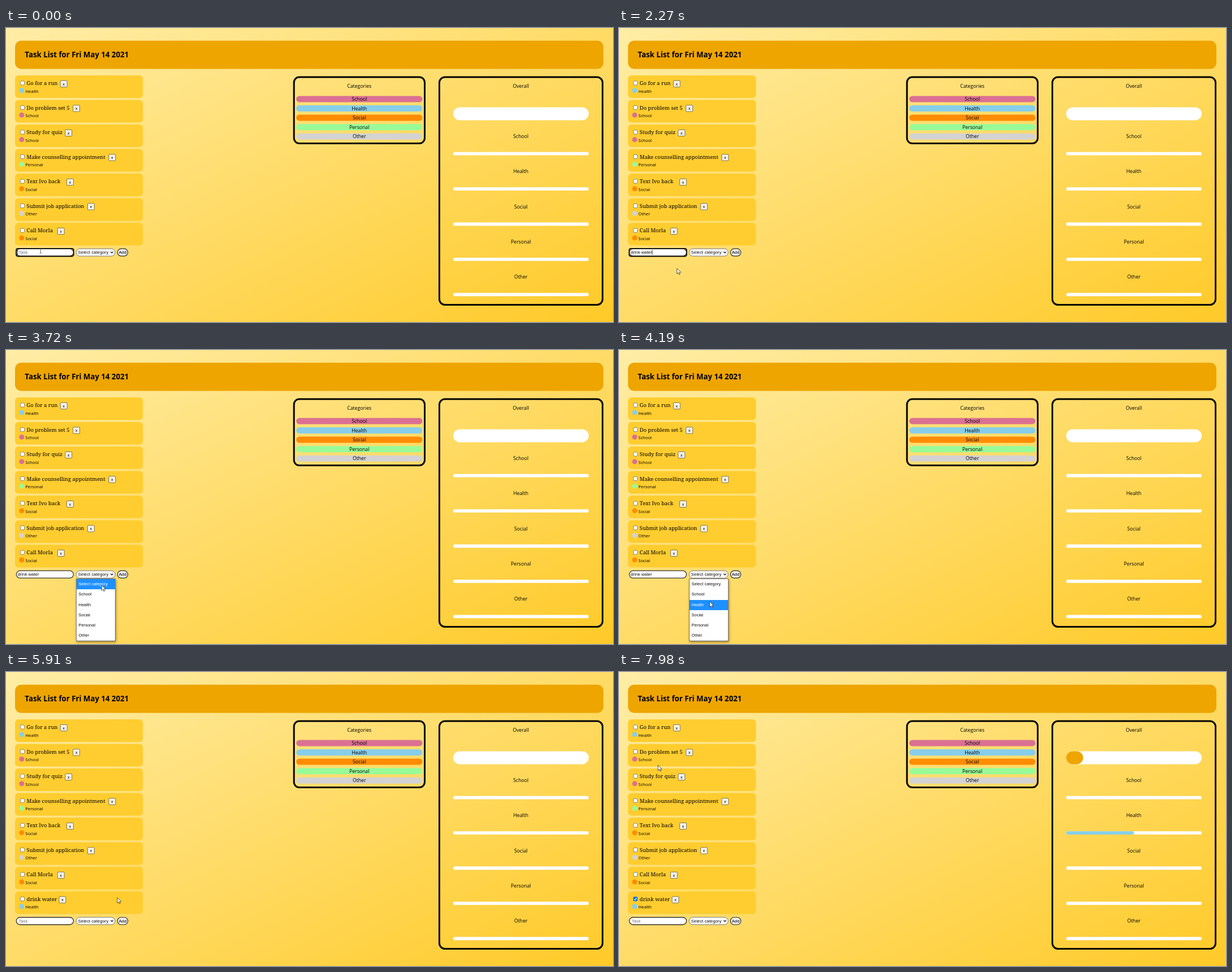
Animation, 1075 px wide and 521 px high, one loop 8000 ms. Source, as an HTML page:

```html
<!DOCTYPE html>
<html lang="en">
<head>
<meta charset="utf-8">
<title>Task List</title>
<style>
  html, body { margin: 0; width: 100%; height: 100%; overflow: hidden; background: #ffdc66; }
  svg { position: absolute; left: 0; top: 0; width: 1075px; height: 521px; }
  text { white-space: pre; }
  .title { font: bold 13.25px "Trebuchet MS", "Open Sans", "Noto Sans", sans-serif; }
  .label { font: 8.7px "Trebuchet MS", "Open Sans", "Noto Sans", sans-serif; text-anchor: middle; }
  .tag { font: 7.7px "Trebuchet MS", "Open Sans", "Noto Sans", sans-serif; }
  .task { font: 9.45px Georgia, "Noto Serif", serif; }
  .ui, .menu { font: 7.8px "Liberation Sans", Arial, sans-serif; }
  .mid { text-anchor: middle; }
  .menu {
    position: absolute; left: 123.5px; top: 405px; width: 70px; height: 111px;
    box-sizing: border-box; box-shadow: 1px 2px 4px rgba(60, 40, 0, .5);
  }
  .list { height: 100%; box-sizing: border-box; background: #fff; border: .7px solid #777; }
  .list div { height: 18.25px; line-height: 18.6px; padding-left: 4px; color: #111; font-size: 7.5px; }
  .list .on { background: #1e90ff; color: #fff; }
</style>
</head>
<body>
<svg id="page" viewBox="0 0 1075 521">
  <defs>
    <linearGradient id="sun" x1="0" y1="0" x2="1" y2="1">
      <stop offset="0" stop-color="#ffeda6"/>
      <stop offset="1" stop-color="#ffca28"/>
    </linearGradient>
  </defs>
  <rect width="1075" height="521" fill="url(#sun)"/>
</svg>
<div class="menu" id="menu"><div class="list" id="list"></div></div>
<svg viewBox="0 0 1075 521">
  <path id="arrow" d="M0 0V9.6L2.3 7.5L3.9 11L5.4 10.3L3.9 7H7Z" fill="#fff" stroke="#222" stroke-width=".75"/>
  <path id="beam" d="M-1.8-4H-.4L0-3.6L.4-4H1.8M0-3.6V3.6M-1.8 4H-.4L0 3.6L.4 4H1.8" fill="none" stroke="#4a4334" stroke-width=".8"/>
</svg>
<script>
const LOOP = 8000;
const $ = id => document.getElementById(id);
const page = $('page');
const COLORS = { School: '#db7093', Health: '#87ceeb', Social: '#ff8c00', Personal: '#98fb98', Other: '#d3d3d3' };
const NAMES = Object.keys(COLORS);

function add(parent, tag, attrs, content) {
  const node = document.createElementNS('http://www.w3.org/2000/svg', tag);
  for (const key in attrs) node.setAttribute(key, attrs[key]);
  if (content) node.textContent = content;
  return parent.appendChild(node);
}
const box = (parent, x, y, width, height, rx, fill, more) =>
  add(parent, 'rect', { x, y, width, height, rx, fill, ...more });
const write = (parent, cls, x, y, content, fill = '#000') =>
  add(parent, 'text', { class: cls, x, y, fill }, content);
const show = (node, on) => { node.style.display = on ? '' : 'none'; };
const line = (stroke, width) => ({ stroke, 'stroke-width': width });

// Header
box(page, 16, 22.5, 1042, 50, 11, '#eea500');
write(page, 'title', 33.3, 52.3, 'Task List for Fri May 14 2021');

// Task cards
const TASKS = [
  ['Go for a run', 'Health', 96],
  ['Do problem set 5', 'School', 118.3],
  ['Study for quiz', 'School', 104.5],
  ['Make counselling appointment', 'Personal', 181.7],
  ['Text Ivo back', 'Social', 107.2],
  ['Submit job application', 'Other', 144.2],
  ['Call Morla', 'Social', 91],
  ['drink water', 'Health', 93.6]
];
const cards = TASKS.map(([name, category, x], i) => {
  const g = add(page, 'g', { transform: `translate(0 ${84 + i * 43.53})` });
  box(g, 16, 0, 226.5, 40, 6, '#ffcd2f');
  const check = box(g, 25.6, 10, 7, 7, 1.4, '#fff', line('#6d6d6d', .8));
  write(g, 'task', 36.6, 17.3, name);
  box(g, x + .4, 9.3, 11.8, 11.2, .8, '#f8f6f0', line('#5c5848', .8));
  write(g, 'ui mid', x + 6.3, 17.5, 'x');
  add(g, 'circle', { cx: 27.8, cy: 26.8, r: 4.5, fill: COLORS[category] });
  write(g, 'tag', 34.2, 30.5, category);
  return { g, check };
});
const added = cards[7];
const tick = add(added.g, 'path', { d: 'M27 13.6l1.5 1.6 2.9-3.4', fill: 'none', ...line('#fff', 1.2) });

// Category legend
box(page, 510, 87, 231.5, 117.5, 9.5, 'none', line('#000', 3));
write(page, 'label', 625.7, 106, 'Categories');
NAMES.forEach((name, i) => {
  const y = 120.4 + i * 16.6;
  box(page, 514, y, 223.5, 11, 5.5, COLORS[name]);
  write(page, 'label', 625.7, y + 8.6, name);
});

// Progress panel
box(page, 767.5, 87, 289, 403.5, 10, 'none', line('#000', 3));
write(page, 'label', 911.8, 106, 'Overall');
box(page, 792, 140.4, 240, 23, 11.5, '#fff');
NAMES.forEach((name, i) => {
  const y = 219.8 + i * 62.4;
  write(page, 'label', 911.8, y - 25, name);
  box(page, 792, y, 240, 5.8, 2.9, '#fff');
});
const done = add(page, 'g', {});
box(done, 792, 140.4, 30, 23, 11.5, '#eea500');
box(done, 792, 282.2, 120, 5.8, 2.9, COLORS.Health);

// Form
const form = add(page, 'g', {});
const field = box(form, 18.3, 391.2, 101.2, 13, 6.5, '#fff', line('#38342a', 1.3));
const ring = box(form, 18, 390.8, 101.8, 13.8, 3, 'none', line('#000', 1.6));
const hint = write(form, 'ui', 22.4, 400.4, 'Task', '#757575');
const typed = write(form, 'ui', 20.4, 400.4, '', '#111');
const caret = box(form, 0, 393.3, .8, 8.6, 0, '#000');
box(form, 124.2, 391.2, 69, 13, 6.5, '#fff', line('#767676', 1));
const choice = write(form, 'ui', 127.6, 400.4, '', '#111');
add(form, 'path', { d: 'M185.4 396.5l2.1 2.2 2.1-2.2', fill: 'none', ...line('#111', 1.2) });
const button = box(form, 197.4, 391.2, 18.4, 13, 6.5, '#f3f3f3', line('#2c2a24', 1.2));
write(form, 'ui mid', 206.6, 400.4, 'Add');

const rows = ['Select category', ...NAMES].map(name => {
  const row = document.createElement('div');
  row.textContent = name;
  return $('list').appendChild(row);
});

// Timeline
const ENTRY = 'drink water';
const KEYS = [580, 670, 750, 840, 1050, 1210, 1330, 1440, 1560, 1680, 1790];
const BLUR = 2940, SHADOW = 3060, OPEN = 3120, PICK = 4225, SUBMIT = 5280;
const PRESS = 7160, CHECK = 7390;
const PATH = [
  [0, 61.3, 395], [2090, 61.3, 395], [2180, 80, 413], [2270, 102.5, 426], [2370, 116, 428],
  [2520, 150, 424], [2660, 190, 412], [2750, 201, 404], [2830, 189, 400], [2910, 172, 399.3],
  [3520, 172, 399.3], [3700, 170, 414], [3880, 164, 437], [4020, 160.5, 446],
  [4190, 160.5, 446], [4400, 172, 428], [4620, 198, 404], [4780, 208, 398],
  [5850, 208, 398], [6050, 172, 404], [6300, 105, 406.5], [6480, 72, 405], [6630, 54, 403],
  [6700, 48, 402.5], [6850, 38, 402], [7020, 28.5, 402],
  [7780, 28.5, 402], [7850, 36, 345], [7920, 54, 245], [7980, 69, 165], [LOOP, 69, 165]
];

function pointer(t) {
  const i = PATH.findIndex(p => p[0] > t);
  const [a, b] = [PATH[i - 1], PATH[i]];
  const k = (t - a[0]) / (b[0] - a[0]);
  return [a[1] + (b[1] - a[1]) * k, a[2] + (b[2] - a[2]) * k];
}

function draw(t) {
  const [x, y] = pointer(t);
  const sent = t >= SUBMIT;
  const focused = t < BLUR;

  const count = sent ? 0 : KEYS.filter(k => k <= t).length;
  const lastKey = count ? KEYS[count - 1] : -210;
  typed.textContent = ENTRY.slice(0, count);
  show(hint, !count);
  show(ring, focused);
  show(caret, focused && (t - lastKey) % 1000 < 500);
  caret.setAttribute('x', 20.3 + (count ? typed.getComputedTextLength() : 0));
  field.setAttribute('stroke', focused ? '#222' : '#38342a');

  choice.textContent = t >= PICK && !sent ? 'Health' : 'Select category';
  const overAdd = !sent && x > 197 && x < 216 && y > 391 && y < 405;
  button.setAttribute('fill', overAdd ? '#dedede' : '#f3f3f3');
  form.setAttribute('transform', `translate(0 ${sent ? 43.53 : 0})`);

  show($('menu'), t >= SHADOW && t < PICK);
  show($('list'), t >= OPEN);
  const hot = Math.max(0, Math.floor((y - 405.7) / 18.25));
  rows.forEach((row, i) => { row.className = i === hot ? 'on' : ''; });

  const checked = t >= CHECK;
  show(added.g, sent);
  show(tick, checked);
  show(done, checked);
  added.check.setAttribute('fill', checked ? '#0b6fd6' : t >= PRESS ? '#ececec' : '#fff');
  added.check.setAttribute('stroke', checked ? '#0b6fd6' : t >= 7000 ? '#444' : '#6d6d6d');

  const onText = sent ? x > 37 && x < 89 && y > 396 && y < 409 : x < 120 && y < 404;
  show($('beam'), onText);
  show($('arrow'), !onText);
  for (const id of ['beam', 'arrow']) $(id).setAttribute('transform', `translate(${x} ${y})`);
}

function tickFrame() {
  draw(performance.now() % LOOP);
  requestAnimationFrame(tickFrame);
}
tickFrame();
</script>
</body>
</html>
```
